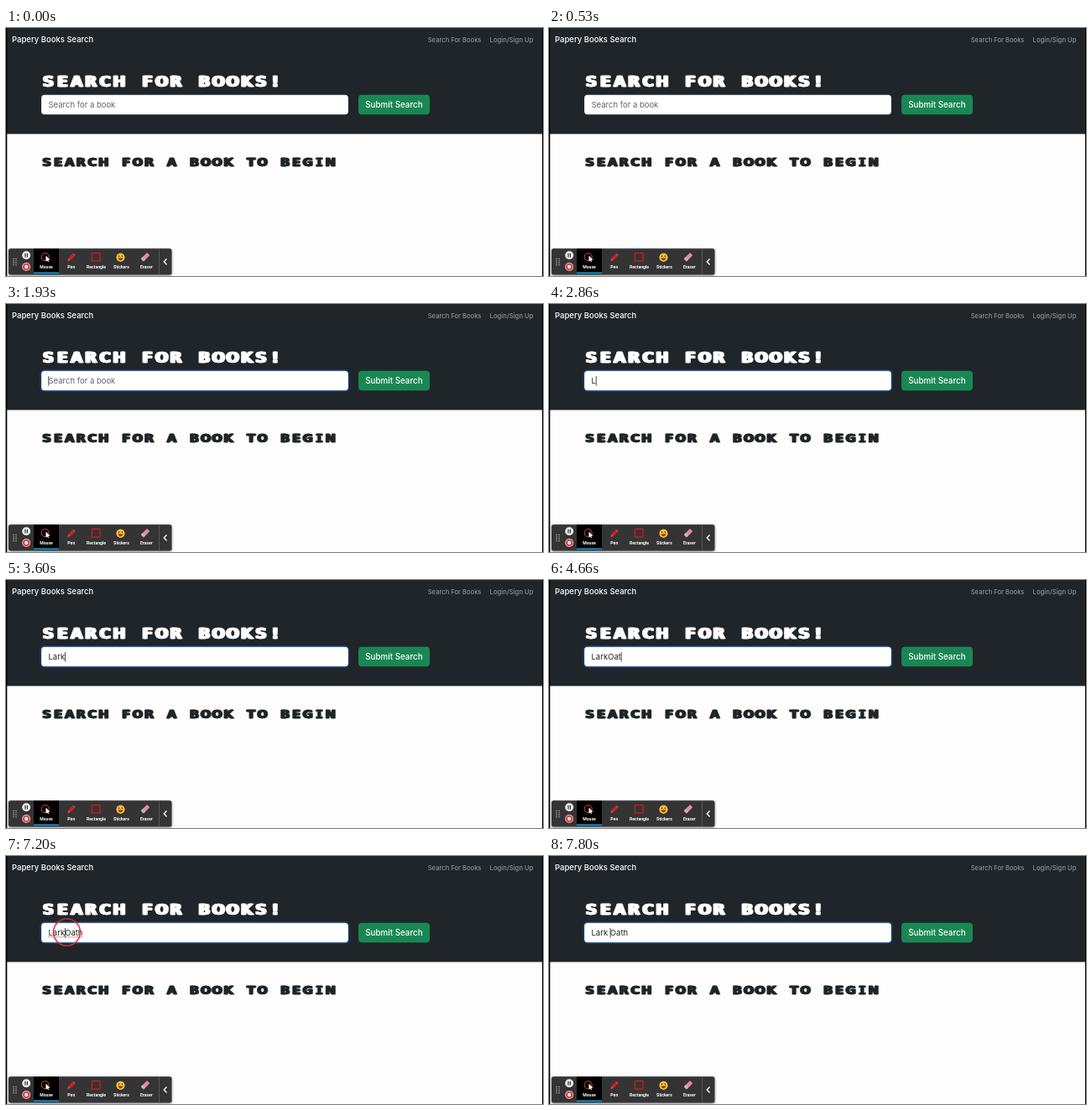
An HTML page with a canvas for the animation above (8000 ms loop, 640 by 296 pixels).

```html
<!DOCTYPE html>
<html lang="en">
<head>
<meta charset="utf-8">
<title>Book search</title>
<style>
  html, body { margin: 0; width: 100%; height: 100%; overflow: hidden; background: #fff; }
  canvas { display: block; width: 640px; height: 296px; }
</style>
</head>
<body>
<canvas id="stage"></canvas>
<script>
const W = 640, H = 296, LOOP = 8000, BLINK = 533, RIPPLE = 335, STEP = 67;
const DARK = '#1f2528', SANS = 'Inter, sans-serif';
const canvas = document.getElementById('stage');
const ctx = canvas.getContext('2d');
const ratio = window.devicePixelRatio || 1;
canvas.width = W * ratio;
canvas.height = H * ratio;
ctx.scale(ratio, ratio);

// Each edit sets the field's text and caret index and restarts the blink.
const edits = [
  [860, '', 0], [2800, 'L', 1], [3200, 'La', 2], [3400, 'Lar', 3], [3600, 'Lark', 4],
  [4330, 'LarkO', 5], [4530, 'LarkOa', 6], [4660, 'LarkOat', 7], [4860, 'LarkOath', 8],
  [7200, 'LarkOath', 4], [7800, 'Lark Oath', 5]
];
const clicks = [[860, 141.5, 93], [7200, 72.5, 91]];

function text(str, x, y, font, color, align = 'left') {
  ctx.font = font;
  ctx.fillStyle = color;
  ctx.textAlign = align;
  ctx.fillText(str, x, y);
}

function box(x, y, w, h, r, color) {
  ctx.fillStyle = color;
  ctx.beginPath();
  ctx.roundRect(x, y, w, h, r);
  ctx.fill();
}

function disc(x, y, r, color) {
  ctx.fillStyle = color;
  ctx.beginPath();
  ctx.arc(x, y, r, 0, Math.PI * 2);
  ctx.fill();
}

function ring(x, y, r, color, width) {
  ctx.strokeStyle = color;
  ctx.lineWidth = width;
  ctx.beginPath();
  ctx.arc(x, y, r, 0, Math.PI * 2);
  ctx.stroke();
}

function shape(points, color) {
  ctx.fillStyle = color;
  ctx.beginPath();
  points.forEach(([x, y]) => ctx.lineTo(x, y));
  ctx.fill();
}

function turned(x, y, angle, draw) {
  ctx.save();
  ctx.translate(x, y);
  ctx.rotate(angle);
  draw();
  ctx.restore();
}

// Wide capitals, one per fixed-pitch cell; sideways overprinting thickens the stems.
function heading(str, x, baseline, size, color) {
  const pitch = size * 0.845;
  ctx.strokeStyle = color;
  ctx.lineWidth = size * 0.03;
  ctx.lineJoin = 'round';
  [...str].forEach((ch, i) => {
    const family = ch === 'I' ? '"DejaVu Sans Mono", monospace' : '"DejaVu Sans", sans-serif';
    const cx = x + (i + 0.5) * pitch;
    for (const shift of [-0.055, 0, 0.055]) {
      const left = cx + shift * size;
      text(ch, left, baseline, `bold ${size * 0.92}px ${family}`, color, 'center');
      ctx.strokeText(ch, left, baseline);
    }
  });
}

function page() {
  ctx.fillStyle = '#fdfdfd';
  ctx.fillRect(0, 0, W, H);
  ctx.fillStyle = DARK;
  ctx.fillRect(0, 0, W, 126.5);
  ctx.fillStyle = '#000';
  ctx.fillRect(0, 0, 1.3, H);
  ctx.fillRect(639, 0, 1, H);
  text('Papery Books Search', 7, 17.3, `500 9.5px ${SANS}`, '#fff');
  text('Search For Books', 502.7, 16.8, `500 7.6px ${SANS}`, '#909395');
  text('Login/Sign Up', 628.5, 16.8, `500 7.7px ${SANS}`, '#909395', 'right');
  heading('SEARCH FOR BOOKS!', 42, 70.2, 20, '#fff');
  heading('SEARCH FOR A BOOK TO BEGIN', 42, 165.3, 16, DARK);
  box(420, 79.7, 85, 23.6, 4, '#198754');
  text('Submit Search', 462.4, 94.8, `500 9.8px ${SANS}`, '#fff', 'center');
}

function field(t) {
  const edit = edits.findLast(e => t >= e[0]);
  if (edit) box(40.3, 78, 369.4, 27, 5.5, '#1c3760');
  box(42, 79.7, 366, 23.6, 4, edit ? '#a9c9fb' : '#ced4da');
  box(42.5, 80.2, 365, 22.6, 3.5, '#fff');
  const [start, value, index] = edit || [0, '', 0];
  const x = 50.5;
  text(value || 'Search for a book', x, 94.8, `9.5px ${SANS}`, value ? DARK : '#5f6468');
  if (!edit) return;
  if (start === 7200) {
    ctx.strokeStyle = '#e0403a';
    ctx.lineWidth = 1;
    ctx.setLineDash([1.2, 1]);
    ctx.beginPath();
    ctx.moveTo(x, 96.7);
    ctx.lineTo(x + ctx.measureText(value).width, 96.7);
    ctx.stroke();
    ctx.setLineDash([]);
  }
  if (Math.floor((t - start) / BLINK) % 2 === 0) {
    ctx.fillStyle = DARK;
    ctx.fillRect(x + ctx.measureText(value.slice(0, index)).width - 0.1, 86, 0.8, 11.5);
  }
}

function ripples(t) {
  for (const [start, x, y] of clicks) {
    const age = t - start;
    if (age < 0 || age >= RIPPLE) continue;
    const r = 16 - 4 * Math.floor(age / STEP);
    if (r > 0) ring(x, y, r, 'rgba(214, 48, 56, 0.88)', 0.4 + r / 12);
  }
}

function toolbar() {
  ctx.save();
  ctx.shadowColor = 'rgba(0, 0, 0, 0.5)';
  ctx.shadowBlur = 3 * ratio;
  ctx.shadowOffsetY = ratio;
  box(3, 263.2, 194.5, 31.3, 2.5, '#343434');
  ctx.restore();
  box(33, 263.5, 30, 30, 0, '#000');
  box(33, 291.5, 30, 1.8, 0, '#129be0');
  box(182, 263.5, 0.7, 30.5, 0, '#666');

  for (let i = 0; i < 8; i++) {
    disc(9 + (i % 2) * 3, 275.5 + (i >> 1) * 2.4, 0.7, '#ccc');
  }
  disc(24.2, 271.3, 5, '#e8e8e8');
  box(22.4, 269.1, 1.2, 4.4, 0, '#333');
  box(24.8, 269.1, 1.2, 4.4, 0, '#333');
  disc(24.2, 285, 5, '#e9c9c9');
  disc(24.2, 285, 4.3, '#d84b4b');
  box(22.5, 283.3, 3.4, 3.4, 0.4, '#fff');

  ring(46.7, 273.2, 4.5, '#d83a35', 1.1);
  shape([[47.5, 271.5], [47.5, 278.7], [49.1, 277.4], [50.2, 279.3], [51.2, 278.7],
    [50.2, 276.9], [52.4, 276.7]], '#fff');

  turned(77.7, 273.8, Math.PI / 4, () => {
    box(-1.8, -5.4, 3.6, 2, 0.6, '#ef3131');
    box(-1.8, -3, 3.6, 5.4, 0, '#e21b1b');
    shape([[-1.8, 2.8], [1.8, 2.8], [0, 6.2]], '#f04a42');
  });

  ctx.strokeStyle = '#dd1717';
  ctx.lineWidth = 1.2;
  ctx.strokeRect(102.5, 268.6, 9.5, 9.5);

  disc(136.5, 273.8, 5.1, '#f7bd32');
  disc(134.6, 272.4, 0.8, '#54371a');
  disc(138.4, 272.4, 0.8, '#54371a');
  ctx.fillStyle = '#8a3b1c';
  ctx.beginPath();
  ctx.arc(136.5, 274.6, 2.6, 0, Math.PI);
  ctx.fill();

  turned(166, 273.3, Math.PI / 4, () => {
    box(-2.3, -5.2, 4.6, 10.4, 1, '#e58a9f');
    box(-2.3, 2, 4.6, 3.2, 0.8, '#d9aab5');
  });

  const labels = ['Mouse', 'Pen', 'Rectangle', 'Stickers', 'Eraser'];
  labels.forEach((label, i) =>
    text(label, 48 + i * 29.8, 286.7, 'bold 5.1px Roboto, sans-serif', '#fff', 'center'));

  ctx.strokeStyle = '#fff';
  ctx.lineWidth = 1.3;
  ctx.lineJoin = 'miter';
  ctx.beginPath();
  ctx.moveTo(191.5, 275.5);
  ctx.lineTo(188.3, 279);
  ctx.lineTo(191.5, 282.5);
  ctx.stroke();
}

const origin = performance.now();
function frame() {
  const t = (performance.now() - origin) % LOOP;
  page();
  field(t);
  ripples(t);
  toolbar();
  requestAnimationFrame(frame);
}
frame();
</script>
</body>
</html>
```
